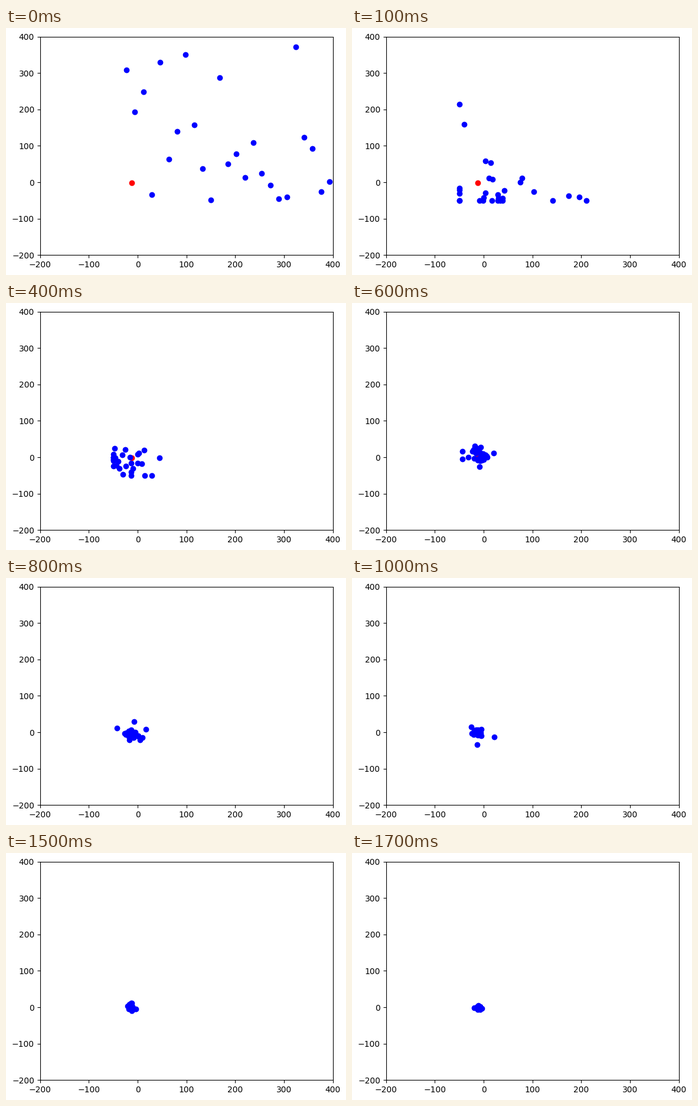
Write a matplotlib script that moves like this. It is 576x418 px and loops after 1.8 s.

```python
import numpy as np
import matplotlib.pyplot as plt
from matplotlib.animation import FuncAnimation

W, H, DPI = 576, 418, 100
STEPS = 18
COUNT = 30
LOW = -50                               # lower wall of the search space
GOAL = np.array([-12, -2])
INERTIA, OWN_PULL, SWARM_PULL = 0.5, 1, 2


def scatter(rng):
    """Even in x, denser towards low y; the last few lie out of view."""
    x = np.linspace(-23, 480, COUNT)
    y = -48 + 420 * np.linspace(0, 1, COUNT) ** 1.5
    return np.column_stack([x, rng.permutation(y)])


def distance(points):
    return np.hypot(*(points - GOAL).T)


def search(seed):
    """Particle swarm search for GOAL: the positions at every step."""
    rng = np.random.default_rng(seed)
    points = scatter(rng)
    speed = np.zeros_like(points)
    own_best = points.copy()
    path = [points]
    for _ in range(STEPS - 1):
        swarm_best = own_best[distance(own_best).argmin()]
        own, swarm = rng.random((2, COUNT, 2))
        speed = (INERTIA * speed
                 + OWN_PULL * own * (own_best - points)
                 + SWARM_PULL * swarm * (swarm_best - points))
        points = np.maximum(points + speed, LOW)
        closer = distance(points) < distance(own_best)
        own_best[closer] = points[closer]
        path.append(points)
    return path


path = search(seed=3)

fig = plt.figure(figsize=(W / DPI, H / DPI), dpi=DPI)
ax = fig.add_axes([57.72 / W, 33.72 / H, 496 / W, 369.6 / H])
ax.set_xlim(-200, 400)
ax.set_ylim(-200, 400)
ax.plot(*GOAL, "ro")
dots, = ax.plot([], [], "bo")


def draw(step):
    dots.set_data(*path[step].T)
    return dots,


anim = FuncAnimation(fig, draw, frames=STEPS, interval=1800 / STEPS, repeat=True)
plt.show()
```
